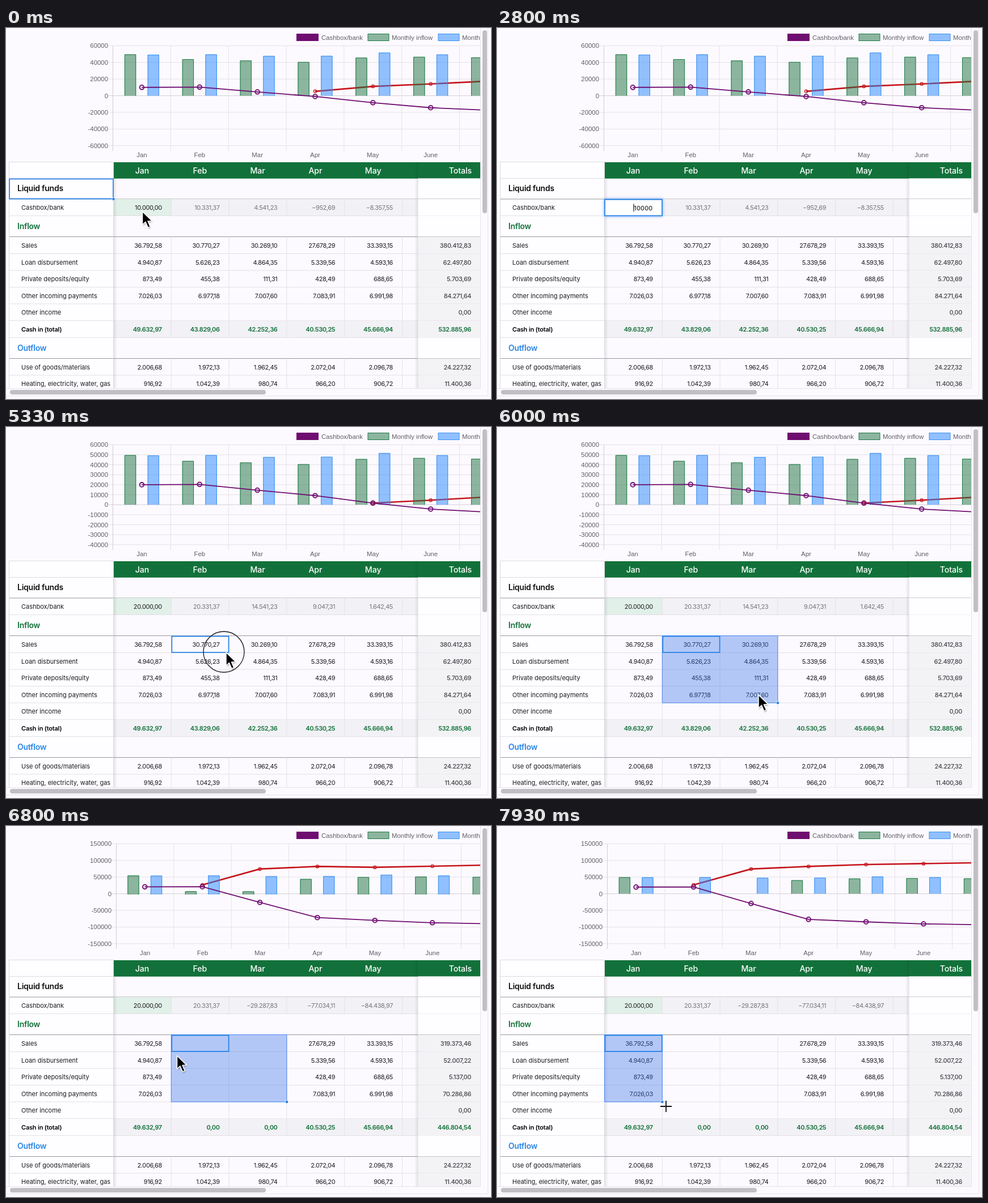
An HTML page for the animation above (8 s loop, 855 by 655 pixels).

```html
<!DOCTYPE html>
<html lang="en">
<head>
<meta charset="utf-8">
<title>Liquidity plan</title>
<style>
html, body { margin: 0; width: 100%; height: 100%; overflow: hidden; background: #fcfaff; }
svg { display: block; width: 855px; height: 655px; }
text { font-family: Inter, "Open Sans", sans-serif; font-size: 11px; fill: #1b1a1f; white-space: pre; }
.chart text { font-family: "Liberation Sans", Arial, sans-serif; font-size: 11.4px; fill: #605e65; }
.num { letter-spacing: -.4px; text-anchor: end; }
.head { font-size: 14.2px; font-weight: 500; letter-spacing: -.1px; }
.section { font-size: 14px; font-weight: 600; letter-spacing: -.25px; }
.mid { text-anchor: middle; }
.end { text-anchor: end; }
</style>
</head>
<body>
<svg viewBox="0 0 855 655">
  <defs>
    <clipPath id="view"><rect width="836.5" height="636"/></clipPath>
    <linearGradient id="fadeR"><stop stop-color="#000" stop-opacity=".09"/><stop offset="1" stop-color="#000" stop-opacity="0"/></linearGradient>
    <linearGradient id="fadeL"><stop stop-color="#000" stop-opacity="0"/><stop offset="1" stop-color="#000" stop-opacity=".09"/></linearGradient>
    <filter id="glow" x="-20%" y="-50%" width="140%" height="200%"><feGaussianBlur stdDeviation="2.5"/></filter>
    <filter id="soft" x="-50%" y="-50%" width="200%" height="200%"><feGaussianBlur stdDeviation="1.2"/></filter>
  </defs>
  <rect width="855" height="655" fill="#fcfaff"/>
  <g clip-path="url(#view)">
    <g id="chart" class="chart"></g>
    <g id="table"></g>
    <g id="select"></g>
  </g>
  <path d="M836.5 0V636.5H0M849.5 0V649.5H0" fill="none" stroke="#e6e4e9"/>
  <rect x="840" y="4" width="8" height="323" rx="4" fill="#c1bfc4"/>
  <rect x="7" y="639" width="451" height="8" rx="4" fill="#c1bfc4"/>
  <g id="pointer"></g>
</svg>
<script>
const LOOP = 8000;
const BLUE = '#2a86e8', GREEN = '#12713a', PURPLE = '#6f0d70', RED = '#c5161c';
// key moments in ms
const T = { click: 250, edit: 480, keys: 1200, home: 2300, del: 3000, type: 3270, enter: 3570,
  back: 4450, press: 5240, drop: 5900, clear: 6320, press2: 7130, drop2: 7560, cross: 7800 };

const cache = {};
function put(id, html) {
  if (cache[id] === html) return;
  cache[id] = html;
  document.getElementById(id).innerHTML = html;
}
const rect = (x, y, w, h, fill, more = '') =>
  `<rect x="${x}" y="${y}" width="${Math.max(0, w)}" height="${Math.max(0, h)}" fill="${fill}" ${more}/>`;
const path = (d, stroke, width = 1, more = '') =>
  `<path d="${d}" fill="none" stroke="${stroke}" stroke-width="${width}" ${more}/>`;
const text = (x, y, s, cls = '', more = '') => `<text x="${x}" y="${y}" class="${cls}" ${more}>${s}</text>`;
const mix = (a, b, k) => a + (b - a) * k;

/* chart */
const MONTHS = ['Jan', 'Feb', 'Mar', 'Apr', 'May', 'June'];
const inflow = [49633, 43829, 42252, 40530, 45667, 46700, 46000];
const outflow = [49302, 49619, 47746, 47935, 51709, 49500, 49000];
const balance = [10000, 10331, 4541, -953, -8358, -14400, -17500];
const nil = null;
const stages = [
  { top: 60000, low: -60000, step: 20000, x: 188.5, w: 101.85, inflow, outflow, balance,
    need: [nil, nil, nil, 5240, 11200, 14150, 17600] },
  { top: 60000, low: -40000, step: 10000, x: 188.5, w: 101.85, inflow, outflow, balance: balance.map(v => v + 10000),
    need: [nil, nil, nil, nil, 1642, 4480, 7800] },
  { top: 150000, low: -150000, step: 50000, x: 194.5, w: 101.35, outflow,
    inflow: inflow.map((v, i) => i == 1 || i == 2 ? 0 : v),
    balance: [20000, 20331, -29288, -77034, -84439, -90500, -93200],
    need: [nil, 26400, 74200, 81800, 87500, 90300, 93200] }
];

const yOf = (s, v) => 31.3 + 176.5 * (s.top - v) / (s.top - s.low);
const xOf = (s, i) => s.x + s.w * (i + .5);

function drawChart(from, to, k) {
  const x = i => mix(xOf(from, i), xOf(to, i), k);
  const y = (key, i) => {
    const a = from[key][i], b = to[key][i];
    return a === nil ? yOf(to, b) : mix(yOf(from, a), yOf(to, b), k);
  };
  const base = mix(yOf(from, 0), yOf(to, 0), k);
  const bar = mix(from.w, to.w, k) * .2;
  let out = '';

  for (let v = to.top; v >= to.low; v -= to.step) {
    const py = yOf(to, v);
    out += path(`M${to.x - 8} ${py}H837`, v ? '#e4e2e7' : '#d2d0d5') + text(to.x - 8.5, py + 4, v, 'end');
  }
  for (let i = 0; i < 7; i++) {
    const px = to.x + i * to.w;
    out += path(`M${px} 31.3V217`, i ? '#e4e2e7' : '#cfcdd2');
    if (MONTHS[i]) out += text(xOf(to, i), 228, MONTHS[i], 'mid');
  }

  const line = (key, color, width, r, dot) => {
    let d = '', dots = '';
    to[key].forEach((v, i) => {
      if (v === nil) return;
      const px = x(i).toFixed(2), py = y(key, i).toFixed(2);
      d += (d ? 'L' : 'M') + px + ' ' + py;
      dots += `<circle cx="${px}" cy="${py}" r="${r}" fill="${color}" fill-opacity=".12" stroke="${color}" stroke-width="${dot}"/>`;
    });
    return path(d, color, width) + dots;
  };
  const bars = (key, side, fill, stroke) => to[key].map((v, i) => {
    const l = x(i) + side * bar - bar / 2, t = y(key, i);
    if (base - t < .4) return '';
    return rect(l, t, bar, base - t, fill) +
      path(`M${l + .5} ${base}V${t + .5}H${l + bar - .5}V${base}`, stroke);
  }).join('');

  out += line('need', RED, 2.6, 2.7, 1.1);
  out += bars('outflow', 1, 'rgba(38,136,255,.5)', '#3a90ea');
  out += bars('inflow', -1, 'rgba(30,115,65,.5)', '#1d7a45');
  out += line('balance', PURPLE, 1.8, 3.9, 1.8);

  out += rect(512, 10, 39, 13, PURPLE) + text(556, 20.5, 'Cashbox/bank');
  out += rect(638, 10.5, 37, 12, 'rgba(30,115,65,.5)', 'stroke="#1d7a45"') + text(680, 20.5, 'Monthly inflow');
  out += rect(762, 10.5, 37, 12, 'rgba(38,136,255,.5)', 'stroke="#3a90ea"') + text(804, 20.5, 'Monthly outflow');
  put('chart', out);
}

/* table */
const EDGES = [265.5, 302, 331.5, 368.5, 398.5, 428, 457.5, 487, 516.5, 546.5, 583.5, 613, 642.5];
const colX = c => 189.5 + 101.8 * c;
const ROWS = [
  ['Liquid funds'],
  ['Cashbox/bank'],
  ['Inflow'],
  ['Sales', '36.792,58 30.770,27 30.269,10 27.678,29 33.393,15', '380.412,83', '319.373,46'],
  ['Loan disbursement', '4.940,87 5.626,23 4.864,35 5.339,56 4.593,16', '62.497,80', '52.007,22'],
  ['Private deposits/equity', '873,49 455,38 111,31 428,49 688,65', '5.703,69', '5.137,00'],
  ['Other incoming payments', '7.026,03 6.977,18 7.007,60 7.083,91 6.991,98', '84.271,64', '70.286,86'],
  ['Other income', '', '0,00', '0,00'],
  ['Cash in (total)', '49.632,97 43.829,06 42.252,36 40.530,25 45.666,94', '532.885,96', '446.804,54'],
  ['Outflow'],
  ['Use of goods/materials', '2.006,68 1.972,13 1.962,45 2.072,04 2.096,78', '24.227,32', '24.227,32'],
  ['Heating, electricity, water, gas', '916,92 1.042,39 980,74 966,20 906,72', '11.400,36', '11.400,36']
];
const CASH = [
  '10.000,00 10.331,37 4.541,23 −952,69 −8.357,55',
  '20.000,00 20.331,37 14.541,23 9.047,31 1.642,45',
  '20.000,00 20.331,37 −29.287,83 −77.034,11 −84.438,97'
];
const SECTION = { 0: '#111', 2: GREEN, 9: BLUE };

function drawTable(stage) {
  const cleared = stage == 2;
  let out = rect(5.5, 236.5, 184, 400, '#fefdff') + rect(190, 237, 647, 28.8, GREEN);
  MONTHS.slice(0, 5).forEach((m, c) => out += text(colX(c) + 50.5, 256.7, m, 'head mid', 'style="fill:#fff"'));
  out += text(821, 256.7, 'Totals', 'head end', 'style="fill:#fff"');
  out += path('M5.5 265.5H189', '#dddbe0');

  ROWS.forEach(([label, vals, total, total2], r) => {
    const y = EDGES[r], h = EDGES[r + 1] - y, base = y + h / 2 + 4.5;
    const section = r in SECTION, sum = r == 8;
    const tone = sum ? `style="fill:${GREEN};font-weight:600"` : '';
    if (r == 1 || sum) out += rect(190, y, 536, h, '#f2f1f5');
    if (r == 1) out += rect(190, y, 101, h, '#e1f0e8');
    out += rect(726, y, 111, h, section || r == 1 ? '#fefdff' : '#f3f2f5');
    if (section) {
      out += text(20, base, label, 'section', `style="fill:${SECTION[r]}"`);
    } else {
      out += text(27, base, label, '', sum ? 'style="font-weight:600;fill:#000;letter-spacing:-.2px"' : '');
      for (let c = 1; c < 6; c++) out += path(`M${colX(c)} ${y}V${y + h}`, '#e4e2e7');
      (r == 1 ? CASH[stage] : vals).split(' ').forEach((v, c) => {
        const gap = cleared && (c == 1 || c == 2);
        if (gap && r > 2 && r < 7) return;
        if (gap && sum) v = '0,00';
        out += text(colX(c) + 85.3, base, v, 'num', r == 1 && c ? 'style="fill:#77757c"' : tone);
      });
      if (total) out += text(820, base, cleared ? total2 : total, 'num', tone || 'style="fill:#46444a;font-weight:500"');
    }
    out += path(`M5 ${y + h}H837`, section ? '#98969b' : '#e2e0e5');
  });
  out += rect(190, 266, 6, 371, 'url(#fadeR)') + rect(720, 237, 6, 400, 'url(#fadeL)');
  out += path('M5.5 637V236.5H189.5V637', '#dddbe0') + path('M726 266V637', '#e2e0e5');
  put('table', out);
}

/* selection and editor */
function box(c0, r0, c1, r1, handle) {
  const left = c => c < 0 ? 5 : colX(c);
  const x = left(c0), y = EDGES[r0], x1 = colX(c1 + 1), y1 = EDGES[r1 + 1];
  let out = '';
  if (c0 != c1 || r0 != r1) {
    out += rect(x, y, x1 - x, y1 - y, 'rgba(60,115,235,.38)', 'stroke="#4b86ee"');
  }
  out += rect(x + 1, y + 1, colX(c0 + 1) - x - 1.5, EDGES[r0 + 1] - y - 1.5, 'none', `stroke="${BLUE}" stroke-width="1.8"`);
  if (handle) out += rect(x1 - 2.5, y1 - 2.5, 5, 5, BLUE, 'stroke="#fff" stroke-width=".8"');
  return out;
}

function editor(t) {
  const s = t < T.del ? '10000' : t < T.type ? '0000' : '20000';
  const left = t < T.home ? Math.min(5, Math.max(0, Math.floor((t - 1400) / 180) + 1)) : 5;
  const ahead = t < T.del ? left : 4;
  const caret = 274.5 - 6.7 * ahead;
  const blink = (t - T.keys + 1000) % 1000 < 700 || t > T.home;
  return rect(189, 301.5, 103, 31, '#5292f7', 'filter="url(#glow)" opacity=".8"') +
    rect(190, 302.8, 101, 28.6, '#fff', `stroke="${BLUE}" stroke-width="1.8"`) +
    text(274.5, 321.5, s, 'num', 'style="letter-spacing:.2px;fill:#000"') +
    (blink ? path(`M${caret} 310.5V324`, '#111', 1.2) : '');
}

const cellAt = (x, y) => [Math.floor((x - 189.5) / 101.8), EDGES.findIndex(e => e > y) - 1];

function selection(t, [x, y]) {
  if (t < T.click) return box(-1, 0, -1, 0, true);
  if (t < T.edit) return box(0, 1, 0, 1, true);
  if (t < T.enter) return editor(t);
  if (t < T.press) return box(0, 2, 0, 2, true);
  if (t < T.press2) {
    const [c, r] = t < T.drop ? cellAt(x, y - 2) : [2, 6];
    return box(1, 3, Math.max(1, c), Math.max(3, r), t >= T.drop);
  }
  const r = t < T.drop2 ? cellAt(x, y)[1] : 6;
  return box(0, 3, 0, Math.max(3, r), t >= T.drop2);
}

/* pointer */
const WAY = [
  [0, 240.5, 324], [T.back, 240.5, 324], [5200, 384, 397], [T.press + 30, 385, 397], [5330, 388, 398],
  [T.drop, 461, 473], [6080, 461, 473], [6650, 301.5, 405.5], [6860, 301.5, 405.5],
  [T.press2 - 40, 252, 382], [T.press2 + 50, 252, 384], [T.drop2 - 40, 254, 473], [T.drop2 + 40, 254, 474],
  [7860, 298, 495], [LOOP, 298, 495]
];
function pointerAt(t) {
  const i = WAY.findIndex(p => p[0] > t), a = WAY[i - 1], b = WAY[i];
  const k = (t - a[0]) / (b[0] - a[0]), e = k * k * (3 - 2 * k);
  return [mix(a[1], b[1], e), mix(a[2], b[2], e)];
}
const ARROW = 'M0 0V23.5L5.4 18.4L9.8 28.4L13.8 26.6L9.5 16.9L17 16.6Z';
const RINGS = [[T.click - 20, 110, 237, 323], [T.edit - 60, 110, 237, 323], [T.press, 190, 384, 397], [T.press2, 190, 249, 384]];

function pointer(t, [x, y]) {
  if (t >= T.keys && t < T.back) return '';
  let out = '';
  for (const [at, len, cx, cy] of RINGS) {
    if (t >= at && t < at + len) out += `<circle cx="${cx}" cy="${cy}" r="36" fill="none" stroke="#151515" stroke-width="1.3"/>`;
  }
  if (t >= T.cross) {
    const d = `M${x - 10} ${y}H${x + 10}M${x} ${y - 10}V${y + 10}`;
    return out + path(d, '#fff', 3.4, 'opacity=".7"') + path(d, '#111', 1.8);
  }
  return out + `<g transform="translate(${x.toFixed(2)} ${y.toFixed(2)})">
    <path d="${ARROW}" transform="translate(1 2)" opacity=".35" filter="url(#soft)"/>
    <path d="${ARROW}" stroke="#fff" stroke-width="1.5" stroke-linejoin="round"/></g>`;
}

function draw(t) {
  const stage = t < T.enter ? 0 : t < T.clear ? 1 : 2;
  const since = t - [0, T.enter, T.clear][stage];
  const k = stage ? 1 - (1 - Math.min(1, since / 1000)) ** 4 : 1;
  drawChart(stages[Math.max(0, stage - 1)], stages[stage], k);
  drawTable(stage);
  const p = pointerAt(t);
  put('select', selection(t, p));
  put('pointer', pointer(t, p));
}

const start = performance.now();
function tick() {
  draw((performance.now() - start) % LOOP);
  requestAnimationFrame(tick);
}
tick();
</script>
</body>
</html>
```
